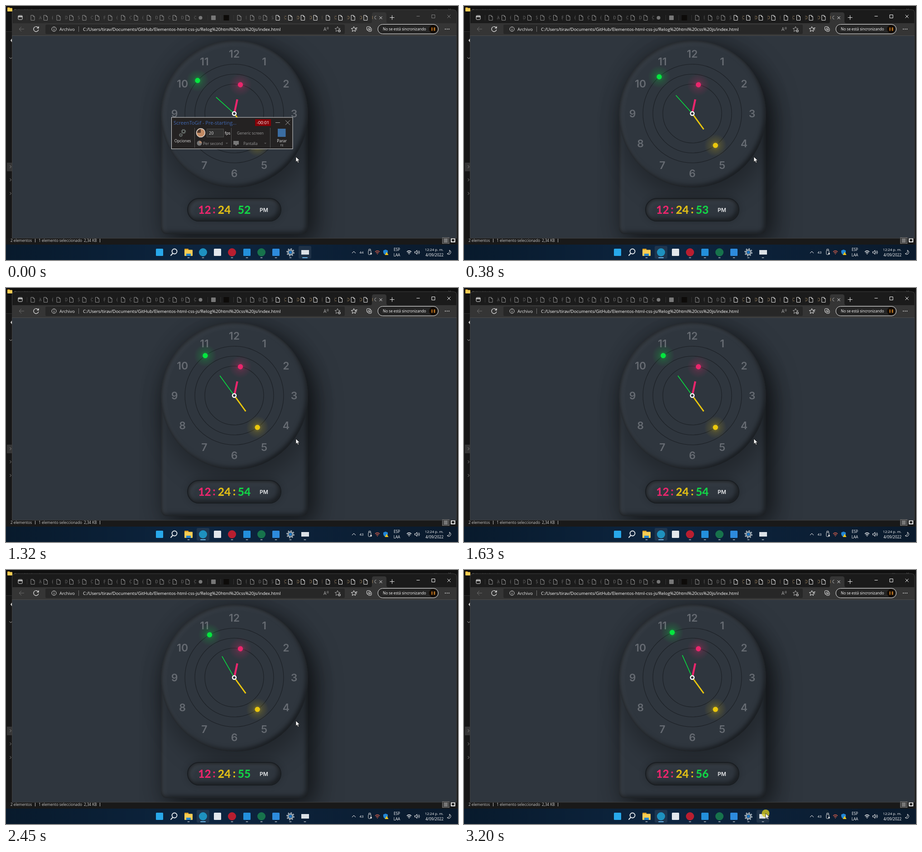
Animation of 998x561 px, one loop 3.25 s. Source, as an HTML page:

```html
<!DOCTYPE html>
<html lang="es">
<head>
<meta charset="utf-8">
<title>Reloj</title>
<style>
html, body { margin: 0; width: 100%; height: 100%; overflow: hidden; background: #171717; }
#page { position: absolute; left: 13px; top: 66px; width: 982px; height: 448px; overflow: hidden; background: #2f363e; }
#page div { position: absolute; box-sizing: border-box; background: #2f363e; }
#plate, #dial, #display {
  --bevel: inset 3px 3px 7px rgba(0,0,0,.4), inset 4px 4px 14px rgba(255,255,255,.11), inset -4px -4px 11px rgba(0,0,0,.55);
}
#plate { left: 329px; top: 10px; width: 325px; height: 428px; border-radius: 162px 162px 14px 14px;
  box-shadow: 16px 16px 54px rgba(0,0,0,.5), 6px 6px 50px rgba(0,0,0,.2), var(--bevel); }
#dial { left: 329px; top: 10px; width: 325px; height: 325px; border-radius: 50%;
  box-shadow: 7px 30px 50px rgba(0,0,0,.28), var(--bevel); }
#display { left: 387px; top: 358px; width: 208px; height: 52px; border-radius: 26px;
  border: 2px solid #191d21; box-shadow: 0 0 16px rgba(0,0,0,.2), var(--bevel); }
svg { position: absolute; left: 0; top: 0; display: block; }
text { font-family: "Open Sans", "Noto Sans", sans-serif; white-space: pre; }
.numeral { font-family: Inter, "Open Sans", sans-serif; font-weight: 600; }
.digit { font-family: Lato, "Open Sans", sans-serif; font-weight: 800; }
</style>
</head>
<body>
<div id="page"><div id="plate"></div><div id="dial"></div><div id="display"></div></div>
<svg id="stage" width="998" height="561" viewBox="0 0 998 561"></svg>
<script>
const LOOP = 3250, FIRST_TICK = 150;
const CX = 504, CY = 237.5;
const PINK = '#ea266c', YELLOW = '#eac70d', GREEN = '#05e63f';
const MID = 'text-anchor="middle"', END = 'text-anchor="end"';

const rect = (x, y, w, h, fill, extra = '') => `<rect x="${x}" y="${y}" width="${w}" height="${h}" fill="${fill}" ${extra}/>`;
const circle = (x, y, r, fill, extra = '') => `<circle cx="${x}" cy="${y}" r="${r}" fill="${fill}" ${extra}/>`;
const path = (d, stroke, width = 1, fill = 'none') => `<path d="${d}" stroke="${stroke}" stroke-width="${width}" fill="${fill}"/>`;
const shape = (d, fill, extra = '') => `<path d="${d}" fill="${fill}" ${extra}/>`;
const text = (x, y, str, size, fill = '#fff', extra = '') => `<text x="${x}" y="${y}" font-size="${size}" fill="${fill}" ${extra}>${str}</text>`;
const group = (id, body, extra = '') => `<g id="${id}" ${extra}>${body}</g>`;

function gear(x, y, r, color) {
  const tooth = 2 * Math.PI * r / 16;
  return circle(x, y, r * .68, 'none', `stroke="${color}" stroke-width="${r * .4}"`) +
    circle(x, y, r, 'none', `stroke="${color}" stroke-width="${r * .4}" stroke-dasharray="${tooth}"`);
}

function folder(x, y, w, h) {
  return rect(x, y, w * .5, h * .4, '#d99a1c', 'rx="1"') + rect(x, y + h * .16, w, h * .84, '#f8cd54', 'rx="1"');
}

function wifi(x, color) {
  return path(`M${x - 5} 543q5-4.5 10 0M${x - 3} 545.5q3-2.5 6 0`, color, 1.3) + circle(x, 547.5, 1, color);
}

function explorer() {
  const chevron = y => path(`M8.5 ${y - 3}l3 3-3 3`, '#888');
  return rect(0, 0, 998, 8, '#101010') + rect(0, 8, 13, 48, '#121212') + rect(0, 56, 13, 1, '#303030') +
    folder(3, 3, 11, 9) + text(18, 11.5, 'Relog html css js', 8, '#888') +
    path('M945 8h7M977 6l5 5M982 6l-5 5', '#666') +
    shape('M13 72v8l-3-4z', '#ddd') + path('M7.5 113.5l3 3 3-3', '#bbb') +
    rect(2, 346, 11, 19, '#363636') + [355, 384, 414].map(chevron).join('') +
    rect(0, 513, 998, 14, '#191919') +
    text(10, 521, '2 elementos', 8.2, '#ccc') + text(72, 521, '1 elemento seleccionado', 8.3, '#ccc') +
    text(172, 521, '2,34 KB', 8.2, '#ccc') + path('M64.5 514v8M207.5 514v8', '#bbb') +
    rect(963.5, 511.5, 15, 13, '#444', 'stroke="#777"') + path('M967 515h8M967 518h8M967 521h8', '#ddd') +
    rect(983, 514, 8, 7, '#222', 'stroke="#eee" stroke-width="2"');
}

function tabs() {
  const letters = 'A(DSCF(C(DCDC   IDSCDDICDDI';
  return [...letters].map((letter, i) => {
    const bright = i >= 19;
    const x = bright ? 600 + 27.7 * (i - 19) : 59 + 28.5 * i;
    let icon = path(`M${x - 4} 20.5h5l3 3v8h-8zM${x + 1} 20.5v3h3`, bright ? '#e8e8e8' : '#8d8d8d');
    if (i === 13) icon = circle(x, 26, 4, '#777');
    if (i === 14) icon = rect(x - 5, 21, 10, 10, '#777', 'rx="1"');
    if (i === 15) icon = rect(x - 6, 20, 12, 12, '#0d0b09');
    return icon + text(x + 14, 29, letter, 8.5, bright ? '#bd9a6a' : '#777') + path(`M${x - 12.5} 20v12`, '#343434');
  }).join('');
}

function browser() {
  const frame = shape('M13 66V16q0-8 8-8H987q8 0 8 8V66z', '#1d1d1d', 'id="titlebar"') +
    path('M13.5 513V16q0-8 8-8H987q8 0 8 8V513z', '#414141') +
    shape('M13 38H804q4 0 4-4V19q0-5 5-5H835q5 0 5 5V34q0 4 4 4H995V66H13z', '#353535') +
    rect(13, 65, 982, 1, '#4b4b4b');
  const left = rect(27, 21, 9, 9, 'none', 'rx="1.5" stroke="#eee"') + path('M27 23.5h9', '#eee', 2) +
    path('M824.5 23l6 6M830.5 23l-6 6M847.5 25.5h10M852.5 20.5v10', '#eee') +
    path('M817.5 22a3.5 3.5 0 1 0 0 7', '#aaa') +
    path('M40 51H29M34 46l-5 5 5 5', '#6f6f6f') +
    path('M71.5 49a5.5 5.5 0 1 0 .3 3M72 45v4h-4', '#eee', 1.2);
  const address = rect(87, 41, 661, 21, '#272727', 'rx="3"') +
    circle(106, 51, 5, 'none', 'stroke="#ddd"') + path('M106 50v4M106 47.5v1.2', '#ddd') +
    text(118, 54.5, 'Archivo', 9.75, '#eee') + path('M160.5 45v12', '#777') +
    text(170, 54.5, 'C:/Users/tirav/Documents/GitHub/Elementos-html-css-js/Relog%20html%20css%20js/index.html', 9.75) +
    text(701, 55, 'A', 10, '#aaa') + path('M708.5 47q2 2 0 4M710.5 46q3 3 0 6', '#aaa', .8);
  const star = (x, color) => path(`M${x} 45.5l1.7 3.7 4 .4-3 2.7.9 4-3.6-2.1-3.6 2.1.9-4-3-2.7 4-.4z`, color);
  const right = star(732, '#aaa') + circle(736, 55, 3, '#aaa') + path('M736 53.5v3M734.5 55h3', '#272727') +
    star(768, '#eee') + path('M772 48.5h4M772 52.5h3', '#eee') +
    rect(796.5, 45.5, 8, 8, 'none', 'rx="2" stroke="#eee"') +
    rect(799.5, 48.5, 7.5, 7.5, '#353535', 'rx="2" stroke="#eee"') + path('M803.2 50v4.5M801 52.2h4.5', '#eee') +
    rect(821, 40.5, 133.5, 21, '#252525', 'rx="10.5" stroke="#eee"') +
    text(832, 54, 'No se está sincronizando', 8.2) +
    circle(943, 51, 9, '#120b05') + rect(939, 47, 3, 8, '#9b5b19', 'rx="1.5"') + rect(944.5, 47, 3, 8, '#b57324', 'rx="1.5"') +
    [970, 974, 978].map(x => circle(x, 51, 1, '#eee')).join('');
  const buttons = group('buttons', path('M906.5 22.5h7M940 19.5h7v7h-7zM974.5 19.5l7 7M981.5 19.5l-7 7', '#fff'));
  return frame + tabs() + left + address + right + buttons;
}

function clock() {
  const digit = (x, y, str, color, extra = '') => text(x, y, str, 24.5, color, `${MID} class="digit" ${extra}`);
  const hand = (id, r, length, width, color, angle) => group(id,
    circle(CX, CY - r, 25, `url(#glow-${id})`) + circle(CX, CY - r, 5.7, color) +
    path(`M${CX} ${CY}v${-length}`, color, width), `transform="rotate(${angle} ${CX} ${CY})"`);
  let out = '';
  for (let n = 1; n <= 12; n++) {
    const a = n * Math.PI / 6;
    out += text(CX + 132 * Math.sin(a), CY + 8.3 - 132 * Math.cos(a), n, 23, '#666b72', `${MID} class="numeral"`);
  }
  for (const r of [65, 87, 109]) out += circle(CX, CY, r, 'none', 'stroke="#1b1f24" stroke-width="1.1"');
  return out + hand('hour', 65, 32, 4.3, PINK, 12) + hand('minute', 87, 43, 2.9, YELLOW, 144) +
    hand('second', 109, 54, 1.5, GREEN, 312) +
    circle(CX, CY, 4, '#2f363e', 'stroke="#fff" stroke-width="2.4"') +
    digit(438.5, 458.5, '12', PINK) + digit(459.5, 458, ':', PINK) +
    digit(482, 458.5, '24', '#dfbd16') + digit(504, 458, ':', '#dfbd16', 'id="colon"') +
    digit(526, 458.5, '52', '#12d246', 'id="seconds"') +
    text(569.5, 454.5, 'PM', 12, '#e3e5e7', `${MID} class="numeral"`);
}

function taskbar() {
  const highlight = x => rect(x - 14, 530, 28, 28, '#fff', 'rx="3" fill-opacity=".08"');
  const dash = x => rect(x - 2.5, 555, 5, 2, '#8c97a3', 'rx="1"');
  const wideDash = x => rect(x - 6, 555, 12, 2, '#6bb8ec', 'rx="1"');
  const square = (x, color) => rect(x - 8, 536, 16, 16, color, 'rx="1.5"');
  const disc = (x, color) => circle(x, 544, 9, color);
  const icons = square(339, '#28a8ea') +
    circle(372, 542, 5.5, 'none', 'stroke="#e7ecf0" stroke-width="1.8"') + path('M368 546.5l-4.5 5', '#e7ecf0', 2) +
    folder(394, 536, 18, 16) + rect(398, 547, 10, 5, '#2786cf') +
    disc(435, '#1e91bf') + square(467, '#e2e7ec') + disc(499, '#b81e30') + square(532, '#2390dc') +
    disc(564, '#17734c') + square(596, '#2d8bdd') + gear(628, 544, 7.5, '#97a4af') + circle(628, 544, 3, '#1976c7') +
    rect(652, 539, 17, 10, '#dce1e6') + [403, 499, 532, 564, 596, 628, 660].map(dash).join('');
  return rect(0, 527, 998, 34, 'url(#bar)') +
    group('edge', highlight(435) + wideDash(435)) + group('hover', highlight(660)) +
    icons + group('edgeIdle', dash(435)) + group('recorderDash', wideDash(660)) + tray();
}

function tray() {
  return path('M764 546l4-4 4 4', '#fff') + text(785, 547, '44', 7.8, '#fff', `${MID} id="reading"`) +
    rect(800, 540, 6, 9, 'none', 'rx="1.5" stroke="#ddd"') + path('M801 540v-3h4v3', '#ddd') + circle(806, 547, 2, '#ddd') +
    wifi(820, '#d9614e') + shape('M838 538l5 2v4q-1 4-5 6-4-2-5-6v-4z', '#2386d5') + shape('M840.5 543l4 7h-8z', '#f2c51c') +
    text(863, 541, 'ESP', 8.2, '#fff', MID) + text(863, 553, 'LAA', 8.2, '#fff', MID) + wifi(890, '#fff') +
    path('M902.5 542.5h2l3-3v9l-3-3h-2zM909.5 542q2 2 0 4M911 540q4 4 0 8', '#fff') +
    text(966, 541, '12:24 p. m.', 8, '#fff', END) + text(966, 552.5, '4/09/2022', 8.4, '#fff', END) +
    path('M979 539q6 4 1 9-4 2-6-1 7-1 5-8z', '#eee');
}

function recorder() {
  const grey = '#989898';
  return group('recorder', rect(365.5, 246, 267.5, 69.5, '#242222', 'stroke="#d8d8d8"') +
    text(370, 262, 'ScreenToGif - Pre-starting...', 11, '#4169b4') +
    rect(550, 250, 35, 15, '#850007') + text(567.5, 261, '-00:01', 9.7, '#fff', MID) +
    path('M595 257.5h10M617 252.5l10 10M627 252.5l-10 10', '#aaa') +
    path('M416.5 269v44M497.5 269v44M583.5 269v44', '#555') +
    gear(392, 277, 4.5, '#69716e') + gear(386, 285, 3.5, '#69716e') + text(390, 301, 'Opciones', 8.4, '#ddd', MID) +
    circle(430, 280, 9.5, '#c28a63', 'stroke="#ded7d0" stroke-width="1.5"') + shape('M430 280v-8a8 8 0 0 0-8 8z', '#513b30') +
    rect(443.5, 271.5, 37, 18, '#303030', 'stroke="#4b4b4b"') + text(448, 283.5, '20', 9, '#ddd') +
    text(483, 283.5, 'fps', 8.7) +
    circle(427, 303, 5.5, '#777') + shape('M427 303v-5.5a5.5 5.5 0 0 1 5.5 5.5z', '#a8836b') +
    text(435, 306.5, 'Per second', 8.5, grey) + shape('M485 302h5l-2.5 3zM570 302h5l-2.5 3z', '#555') +
    text(539.5, 283.5, 'Generic screen', 8.5, grey, MID) +
    rect(502, 298, 12, 8, '#777') + rect(506, 306, 4, 2, '#777') + text(524, 306.5, 'Pantalla', 8.4, grey) +
    rect(600, 271, 17.5, 18, '#3b6da2') + text(609, 301, 'Parar', 8.5, '#eee', MID) + text(609, 310, 'F8', 6.3, '#aaa', MID));
}

function pointerArrow() {
  return group('cursor', circle(0, 0, 8.5, '#d6c91c', 'id="press" fill-opacity=".78"') +
    path('M0 0v11.5l2.7-2.5 1.9 4.3 2-.9-1.9-4.2h3.8z', '#111', .8, '#fff'));
}

const glows = Object.entries({ hour: PINK, minute: YELLOW, second: GREEN }).map(([id, color]) => {
  const stop = (offset, opacity) => `<stop offset="${offset}" stop-color="${color}" stop-opacity="${opacity}"/>`;
  return `<radialGradient id="glow-${id}">${stop(0, .42) + stop(.45, .14) + stop(1, 0)}</radialGradient>`;
}).join('');
const bar = '<linearGradient id="bar"><stop stop-color="#081a2c"/><stop offset=".45" stop-color="#0d2540"/><stop offset="1" stop-color="#0a1a2c"/></linearGradient>';

const stage = document.getElementById('stage');
stage.innerHTML = `<defs>${glows}${bar}</defs>` + explorer() + browser() + clock() + taskbar() + recorder() + pointerArrow();

const el = Object.fromEntries([...stage.querySelectorAll('[id]')].map(node => [node.id, node]));
const fade = (node, opacity) => node.setAttribute('opacity', Number(opacity));

// time, x, y of the pointer tip
const trail = [[2500, 640, 333], [2650, 651, 370], [2800, 668, 433], [2920, 668, 490], [3080, 666, 537.5]];

function pointer(t) {
  const next = trail.findIndex(([time]) => t < time);
  if (next === 0) return trail[0].slice(1);
  if (next < 0) return trail[trail.length - 1].slice(1);
  const [t0, x0, y0] = trail[next - 1], [t1, x1, y1] = trail[next];
  const k = (t - t0) / (t1 - t0);
  return [x0 + (x1 - x0) * k, y0 + (y1 - y0) * k];
}

function draw(t) {
  const elapsed = t - FIRST_TICK;
  const seconds = 53 + Math.floor(elapsed / 1000);
  el.seconds.textContent = seconds;
  el.second.setAttribute('transform', `rotate(${seconds * 6} ${CX} ${CY})`);
  fade(el.colon, (elapsed + 1000) % 1000 < 500);

  const recording = t >= 50, active = t >= 200;
  fade(el.recorder, !recording);
  fade(el.recorderDash, !recording);
  fade(el.buttons, active ? 1 : .4);
  el.titlebar.setAttribute('fill', active ? '#1b1b1b' : '#292929');
  fade(el.edge, active ? 1 : recording ? .5 : 0);
  fade(el.edgeIdle, !recording);
  el.reading.textContent = t < 300 ? '44' : '43';

  const [x, y] = pointer(t);
  el.cursor.setAttribute('transform', `translate(${x} ${y})`);
  fade(el.hover, !recording || y > 528);
  fade(el.press, t >= 3150);
}

const start = performance.now();
function tick() {
  draw((performance.now() - start) % LOOP);
  requestAnimationFrame(tick);
}
tick();
</script>
</body>
</html>
```
